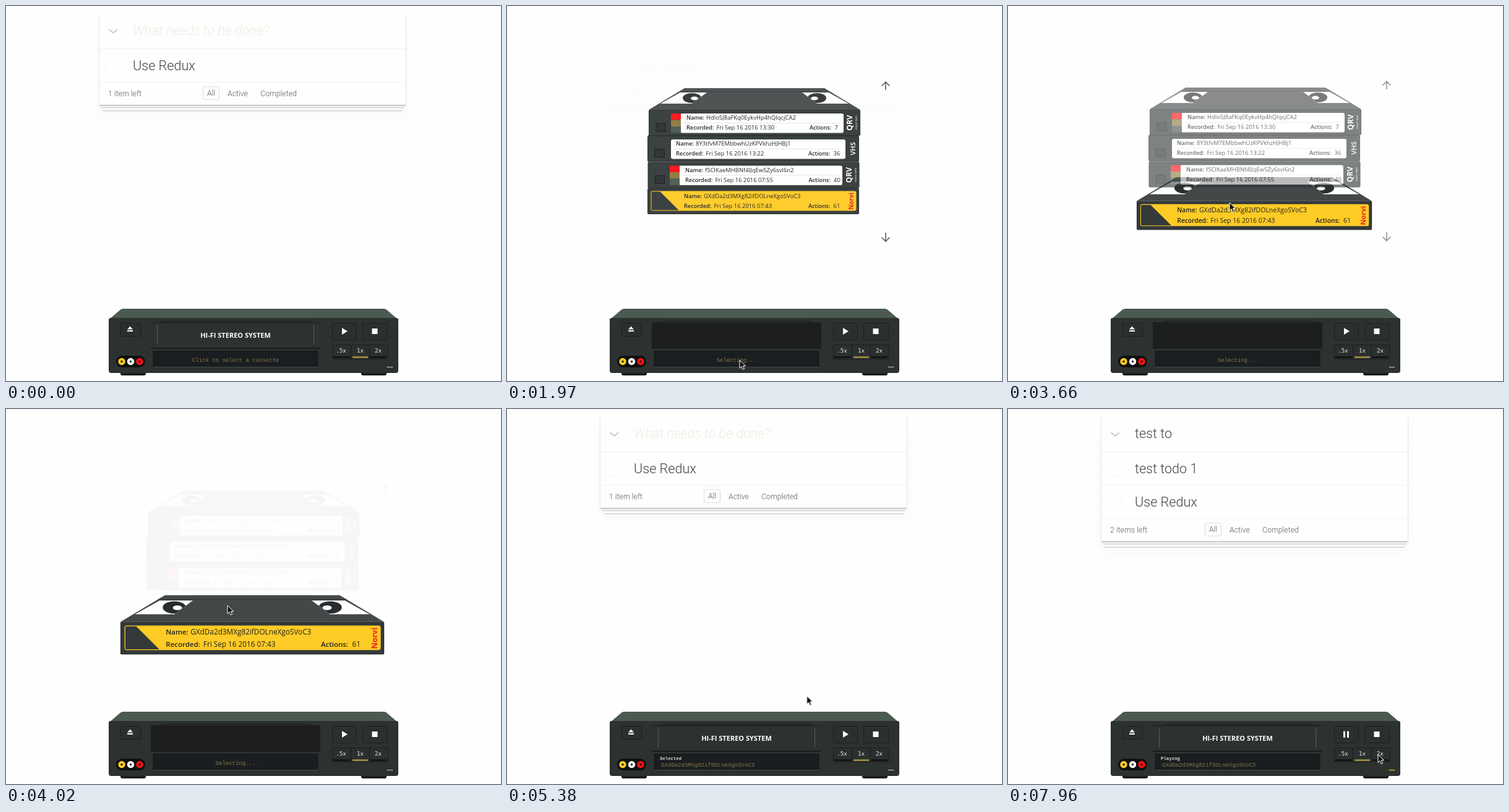
Animation, 800 px wide and 607 px high, one loop 8000 ms. Source, as an HTML page:

```html
<!DOCTYPE html>
<html lang="en">
<head>
<meta charset="utf-8">
<title>Cassette player</title>
<style>
  html, body { margin: 0; width: 100%; height: 100%; overflow: hidden; background: #fefefe; }
  #stage { position: relative; width: 800px; height: 607px; overflow: hidden; }
  #stage > svg { position: absolute; left: 0; top: 0; }
  svg text { font-family: "Open Sans", sans-serif; white-space: pre; }

  .anim { animation: 8s linear infinite; }

  /* Todo card */
  #card {
    position: absolute; left: 151px; top: 11px; width: 495px;
    background: #fefefe; color: #444;
    font: 300 21.6px/54px Roboto, sans-serif;
    box-shadow: 0 1px 1px rgba(0,0,0,.2), 0 2px 3px rgba(0,0,0,.14),
      0 7px 0 -3px #fdfdfd, 0 8px 1px -3px rgba(0,0,0,.2),
      0 14px 0 -5px #fdfdfd, 0 15px 1px -5px rgba(0,0,0,.2),
      0 18px 20px -2px rgba(0,0,0,.03);
    animation-name: card;
  }
  .row { position: relative; height: 53px; padding-left: 54px; border-top: 1px solid #f3f1ec; }
  .row i { position: absolute; left: 7px; top: 12px; width: 26px; height: 26px; border: 1px solid #f8f6f3; border-radius: 50%; }
  .entry { height: 58px; line-height: 58px; border: 0; }
  .entry svg { position: absolute; left: 14px; top: 25px; }
  #entry { white-space: pre; }
  .hint { color: #f0ebe1; font-style: italic; }
  .foot { position: relative; height: 36px; border-top: 1px solid #f3f1ec; font-size: 12.3px; line-height: 36px; color: #5c5c5c; }
  .foot span { position: absolute; top: 0; }
  .foot .on { left: 167px; top: 6px; width: 25px; height: 20px; line-height: 21px; text-align: center; border: 1px solid #dcdcdc; border-radius: 3px; }
  #added { display: none; }
  .more #added { display: block; }

  /* Player */
  .btn { fill: #2b302f; stroke: #1b1f1f; }
  .speed { font: 9px "DejaVu Sans Mono", monospace; fill: #eee; text-anchor: middle; }
  .lcd { font-family: "Liberation Mono", monospace; font-size: 9px; fill: #857848; }
  #slot { position: absolute; left: 234px; top: 512px; width: 274px; height: 42px; perspective: 300px; perspective-origin: 50% 0; }
  #door {
    box-sizing: border-box; height: 42px; background: #2d3231; color: #fff;
    border: solid #171a1a; border-width: 1px 0; transform-origin: 50% 0;
    font: 700 11px/39px "Open Sans", sans-serif; text-align: center;
    animation-name: door;
  }
  #door::before { content: ""; position: absolute; left: 10px; right: 10px; top: 4px; bottom: 5px; border: solid #565c5b; border-width: 0 1px; }

  /* Cassettes */
  .tape text { font-size: 9.45px; fill: #222; }
  .tape .b { font-size: 9.2px; font-weight: 600; }
  .tape .brand { font-weight: 700; text-anchor: middle; }
  #stack { animation-name: enter; }
  #rest { animation-name: leave; }
  #pick { animation-name: pick; }
  #cursor { animation-name: cursor; }

  @keyframes card {
    0%, 18.75% { opacity: 1; }
    22.375% { opacity: .65; }
    24.625% { opacity: .03; }
    26%, 56% { opacity: 0; }
    61%, 100% { opacity: 1; }
  }
  @keyframes door {
    0%, 18.75% { transform: rotateX(0); }
    22.375% { transform: rotateX(-59deg); }
    24.2%, 57.5% { transform: rotateX(-90deg); }
    61%, 100% { transform: rotateX(0); }
  }
  @keyframes enter {
    0%, 20% { opacity: 0; transform: translateY(46px); }
    22.375% { opacity: .22; transform: translateY(31px); }
    24.625% { opacity: .96; transform: translateY(1px); }
    28%, 100% { opacity: 1; transform: none; }
  }
  @keyframes leave {
    0%, 43% { opacity: 1; }
    50.25% { opacity: .04; }
    51.4%, 100% { opacity: 0; }
  }
  @keyframes pick {
    0%, 40.25% { opacity: 1; transform: translate(398px, 315px) scale(1); }
    42.375% { transform: translate(398px, 319.5px) scale(1.03); animation-timing-function: ease-in-out; }
    50.25% { transform: translate(398px, 371px) scale(1.247); }
    51.5% { transform: translate(398px, 373px) scale(1.25); animation-timing-function: ease-in-out; }
    57% { opacity: 1; transform: translate(371px, 534px) scale(.78); }
    58.5%, 100% { opacity: 0; transform: translate(371px, 532px) scale(.72); }
  }
  @keyframes cursor {
    0%, 12.5% { transform: translate(396px, 612px); animation-timing-function: ease-out; }
    17.5%, 30.1% { transform: translate(376px, 573px); animation-timing-function: ease-in-out; }
    39.5%, 62.25% { transform: translate(358px, 318px); animation-timing-function: ease-in; }
    67.25% { transform: translate(484px, 464px); animation-timing-function: ease-out; }
    70%, 83.75% { transform: translate(546px, 527px); animation-timing-function: ease-in-out; }
    88.9%, 93% { transform: translate(594px, 546px); animation-timing-function: ease-in-out; }
    96%, 100% { transform: translate(598px, 559px); }
  }
</style>
</head>
<body>
<div id="stage">
  <svg width="800" height="607">
    <rect x="185" y="590" width="41" height="8" rx="3" fill="#1a1d1d"/>
    <rect x="574" y="590" width="41" height="8" rx="3" fill="#1a1d1d"/>
    <path d="M167 507L185 491.5Q187 490 189 490H611Q613 490 615 491.5L633 507Z" fill="#4a5a50"/>
    <path d="M166 508Q166 505 169 505H631Q634 505 634 508V590Q634 594 630 594H170Q166 594 166 590Z" fill="#2d3231"/>
    <path d="M246 513L257 510H487L497 513" fill="none" stroke="#171a1a"/>
    <rect x="234" y="512" width="274" height="43" fill="#1c1e20"/>
    <rect x="238" y="558.5" width="266" height="26" fill="#1b1e20" stroke="#151717"/>
    <path d="M238 584.5H504" stroke="#444a49"/>

    <rect class="btn" x="185.5" y="513.5" width="32" height="21" rx="1"/>
    <path d="M196 523.5L200.5 518.5L205 523.5ZM196 525H205V527H196Z" fill="#fff"/>
    <rect class="btn" x="527.5" y="513.5" width="39" height="27" rx="1"/>
    <rect class="btn" x="576.5" y="513.5" width="40" height="27" rx="1"/>
    <path id="play" fill="#fff"/>
    <path d="M591.5 522H600.5V531H591.5Z" fill="#fff"/>

    <rect class="btn" x="527.5" y="548.5" width="90" height="23" rx="1"/>
    <path d="M557.5 549V571M587.5 549V571" stroke="#171a1a"/>
    <path d="M528 568.5H556M589 568.5H615" stroke="#131515" stroke-width="3"/>
    <path d="M560 568.5H585" stroke="#95833f" stroke-width="3"/>
    <text class="speed" x="541.5" y="561">.5x</text>
    <text class="speed" x="572.5" y="561">1x</text>
    <text class="speed" x="601.5" y="561">2x</text>
    <rect id="lamp" x="615" y="583" width="11" height="3" stroke="#171a1a" stroke-width=".8"/>

    <rect x="178" y="566" width="47" height="19" rx="9.5" fill="#0f1111"/>
    <g stroke-width="4" fill="#111">
      <circle cx="187" cy="575.5" r="3.7" stroke="#ffcb25"/>
      <circle cx="201.5" cy="575.5" r="3.7" stroke="#fff"/>
      <circle cx="216" cy="575.5" r="3.7" stroke="#fb1116"/>
    </g>

    <text id="msg" class="lcd" x="371" y="575.5" text-anchor="middle"></text>
    <text id="state" class="lcd" x="247" y="567.5" style="font-size:7.3px;font-weight:700;fill:#dcdcd4"></text>
    <text id="title" class="lcd" x="249" y="579"></text>
  </svg>

  <div id="slot"><div id="door" class="anim">HI-FI STEREO SYSTEM</div></div>

  <svg width="800" height="607">
    <g id="stack" class="anim">
      <g id="pick" class="anim"></g>
      <g id="rest" class="anim">
        <g id="others"></g>
        <path d="M612 135V122M605.5 128.5L612 122L618.5 128.5M612 366V380M605.5 373.5L612 380L618.5 373.5" fill="none" stroke="#555" stroke-width="1.6"/>
      </g>
    </g>
  </svg>

  <div id="card" class="anim">
    <div class="row entry">
      <svg width="16" height="10"><path d="M1.5 2L8.5 7.5L15 2" fill="none" stroke="#c9c9c9" stroke-width="2"/></svg>
      <span id="entry"></span>
    </div>
    <div class="row" id="added"><i></i>test todo 1</div>
    <div class="row"><i></i>Use Redux</div>
    <div class="foot">
      <span id="count" style="left:14px"></span>
      <span class="on">All</span>
      <span style="left:207px">Active</span>
      <span style="left:260px">Completed</span>
    </div>
  </div>

  <svg width="800" height="607">
    <path id="cursor" class="anim" d="M0 0V13.4L3.1 10.5L5.2 15.4L7.6 14.4L5.5 9.6H9.6Z" fill="#111" stroke="#fff"/>
  </svg>
</div>

<script>
const $ = id => document.getElementById(id);
const ID = 'GXdDa2d3MXg82ifDOLneXgoSVoC3';

const side = (text, x, size, fill) =>
  `<text class="brand" transform="translate(${x} 21) rotate(-90)" style="font-size:${size}px;fill:${fill}">${text}</text>`;

const reel = `<path d="M51 -28H94L70 -10H19Z" fill="#fff"/>
  <g clip-path="url(#window)"><ellipse cx="70" cy="-19" rx="15" ry="8" fill="#2a2d2f"/><ellipse cx="74" cy="-18.5" rx="6" ry="3" fill="#fff"/></g>`;

const shell = `<path d="M58 -35H284L342 0H0Z" fill="#444849"/>
  <path d="M49 -29.5H293" stroke="#33373a" stroke-width=".8"/>
  ${reel}<g transform="translate(342 0) scale(-1 1)">${reel}</g>
  <rect x=".5" y=".5" width="341" height="41" rx="1" fill="#34393a" stroke="#25292a"/>`;

// x is the left edge of the label text
const info = (x, name, time, actions) => `
  <text class="b" x="${x}" y="16.3">Name:</text><text x="${x + 32}" y="16.3">${name}</text>
  <text class="b" x="${x}" y="32">Recorded:</text><text x="${x + 48.5}" y="32">Fri Sep 16 2016 ${time}</text>
  <text class="b" x="260" y="32">Actions:</text><text x="300.5" y="32">${actions}</text>`;

const yellowLabel = `<rect x="5.5" y="4.5" width="332" height="32" rx="3" fill="#ffcb25"/>
  <path d="M8 5.5H20.5L50.5 35.5H8Q6.5 35.5 6.5 34V7Q6.5 5.5 8 5.5Z" fill="#34393a"/>`;

const whiteLabel = (x, end, stripes) => `
  <rect x="${x}" y="6" width="${end - x}" height="31.5" rx="3" fill="#fff"/>
  <path d="M${x + 6} 21.5H${end - 6}" stroke="#bbb" stroke-dasharray="1 1.5"/>
  <rect x="12" y="22" width="15" height="13" fill="#2b2f30" stroke="#141616"/>` +
  (stripes ? ['#fb1116', '#8b7a3e', '#4a5a50'].map((c, i) =>
    `<rect x="${x - 15}" y="${6 + i * 10.5}" width="16" height="10.5" fill="${c}"/>`).join('') : '');

const tape = (x, y, body) => `<g class="tape" transform="translate(${x} ${y})">${shell}${body}</g>`;
const maker = side('QRV', 329, 12, '#fff') + side('VIDEO TAPE', 337, 4, '#bbb');

$('pick').innerHTML = '<clipPath id="window"><path d="M51 -28H94L70 -10H19Z"/></clipPath>' +
  tape(-171, -21, yellowLabel + info(59, ID, '07:43', 61) + side('Norvi', 333, 10, '#e3201f'));
$('others').innerHTML =
  tape(227.5, 251.5, whiteLabel(50.5, 314.5, true) + info(60.5, 'fSCIKaeMHBNf4IJqEw5Zy6svI6n2', '07:55', 40) + maker) +
  tape(227, 209, whiteLabel(38, 320, false) + info(46, '8Y3tfvM7EMbbwhUzKPVkhzHJHBj1', '13:22', 36) + side('VHS', 335.5, 11, '#ddd')) +
  tape(229, 167, whiteLabel(51, 315, true) + info(61, 'Hdlo5J8aFKq0EykvHp4hQIqcjCA2', '13:30', 7) + maker);

const typed = (text, t, start, step) => text.slice(0, Math.max(0, Math.floor((t - start) / step) + 1));
const put = (id, text) => { if ($(id).textContent !== text) $(id).textContent = text; };

// Share the clock of the CSS animations
const clock = $('cursor').getAnimations()[0];

function frame() {
  const t = (clock.currentTime || 0) % 8000;
  const playing = t >= 5680, chosen = t >= 4500, added = t >= 6680;
  const entry = added ? typed('test todo 2', t, 7440, 80) : typed('test todo 1', t, 5800, 72);

  put('entry', entry || 'What needs to be done?');
  $('entry').className = entry ? '' : 'hint';
  $('card').classList.toggle('more', added);
  put('count', added ? '2 items left' : '1 item left');

  put('msg', chosen ? '' : t < 1500 ? 'Click to select a cassette' : 'Selecting...');
  put('state', playing ? 'Playing' : chosen ? 'Selected' : '');
  put('title', chosen ? ID : '');
  $('lamp').setAttribute('fill', playing ? '#a8923f' : '#8b8f8e');
  $('play').setAttribute('d', playing ? 'M542 521.5H545V532H542ZM548 521.5H551V532H548Z' : 'M543 521L552 526.5L543 532Z');
  requestAnimationFrame(frame);
}
frame();
</script>
</body>
</html>
```
